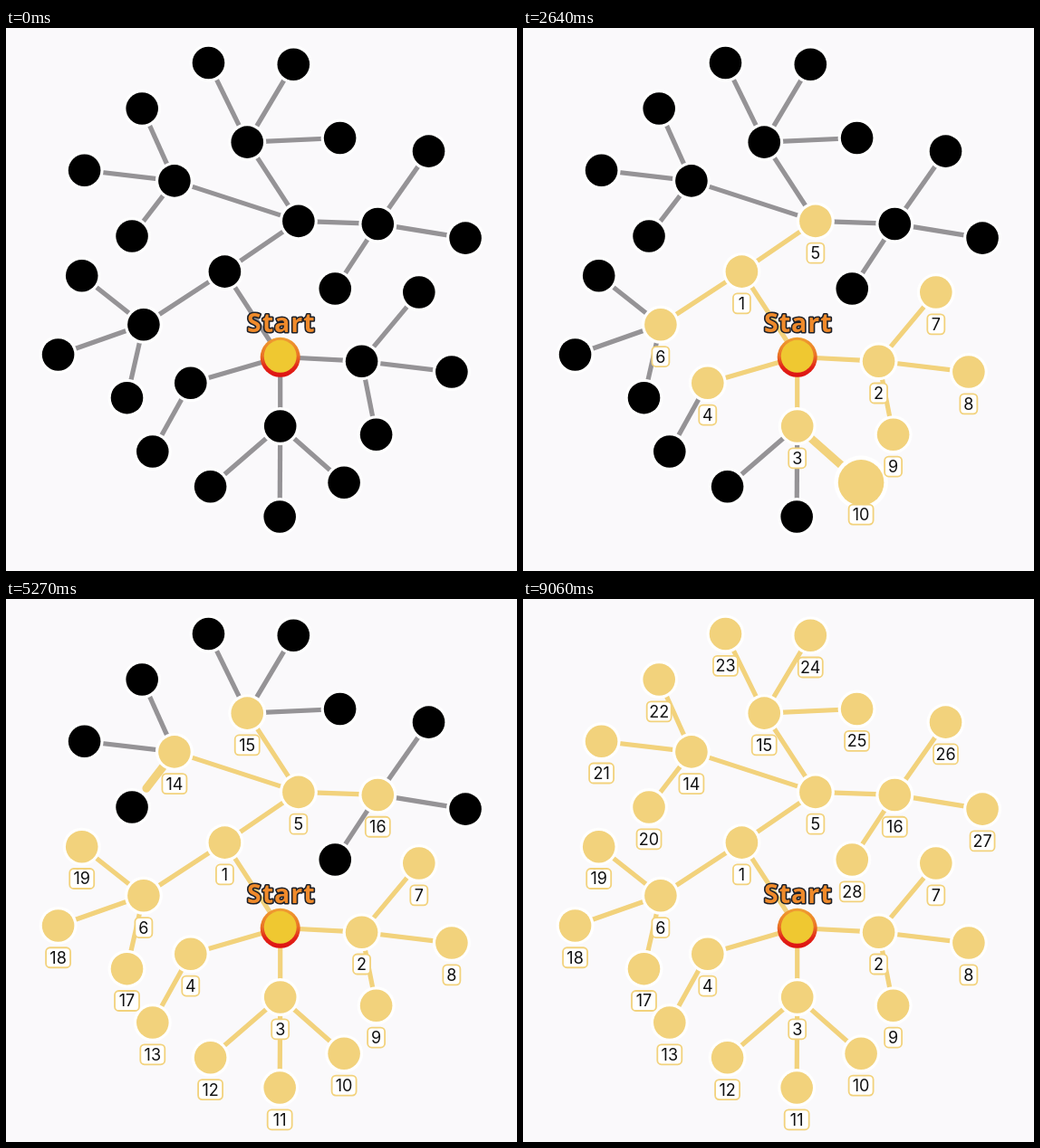
Animation, 564 px wide and 600 px high, one loop 9090 ms. Source, as an HTML page with a canvas:

```html
<!DOCTYPE html>
<html lang="en">
<head>
<meta charset="utf-8">
<title>Breadth-first walk</title>
<style>
  html, body { margin: 0; width: 100%; height: 100%; overflow: hidden; background: #faf9fb; }
  canvas { display: block; }
</style>
</head>
<body>
<canvas id="stage" width="564" height="600"></canvas>
<script>
const ctx = document.getElementById('stage').getContext('2d');
const LOOP = 9090, FIRST = 79, STEP = 267, GROW = 180;
const POP_FROM = 145, POP_TO = 198;
const GOLD = '#f2d27c', GRAY = '#959396', PAPER = '#faf9fb';
const TAU = Math.PI * 2;

// The index of a node is its place in the visiting order.
const root = { x: 302.7, y: 363.5 };
const nodes = [root];

function branch(from, degrees, reach) {
  const parent = nodes[from], a = degrees * TAU / 360;
  nodes.push({ x: parent.x + reach * Math.cos(a), y: parent.y + reach * Math.sin(a), parent });
}

// Three evenly turned branches, the middle one at full reach.
function fan(from, degrees, gap, reach, lastReach) {
  [reach, 100, lastReach].forEach((r, k) => branch(from, degrees + k * gap, r));
}

function buildTree() {
  branch(0, -123, 112.5);
  branch(0, 3, 90);
  branch(0, 90, 76.5);
  branch(0, 163.8, 103);
  branch(1, -34.4, 98.7);
  branch(1, 146.8, 107);
  branch(2, -50.3, 99);
  branch(2, 6.8, 100);
  branch(2, 78.8, 82.6);
  fan(3, 41.5, 48.8, 94, 102);
  branch(4, 119, 86.6);
  branch(5, 198, 144);
  branch(5, 237, 104);
  branch(5, 2, 87.5);
  fan(6, 102.8, 57.8, 83, 87);
  fan(14, 127.5, 59.2, 77, 87.5);
  fan(15, 244, 56.7, 97.5, 102.5);
  branch(16, -55, 98);
  branch(16, 9.2, 98);
  branch(16, 123.3, 85.7);
}

function disc(x, y, r, fill) {
  ctx.fillStyle = fill;
  ctx.beginPath();
  ctx.arc(x, y, r, 0, TAU);
  ctx.fill();
}

function drawEdge({ x, y, parent }, phase) {
  const active = phase >= 0;
  const part = active ? Math.min(phase / GROW, 1) : 1;
  ctx.strokeStyle = active ? GOLD : GRAY;
  ctx.lineWidth = active && phase < POP_TO ? 9 : 5.2;
  ctx.lineCap = active ? 'round' : 'butt';
  ctx.beginPath();
  ctx.moveTo(parent.x, parent.y);
  ctx.lineTo(parent.x + (x - parent.x) * part, parent.y + (y - parent.y) * part);
  ctx.stroke();
}

function drawNode({ x, y }, phase) {
  const pop = (phase - POP_FROM) / (POP_TO - POP_FROM);
  const scale = pop > 0 && pop < 1 ? 1 + 0.57 * Math.sin(Math.PI * pop) : 1;
  disc(x, y, 21 * scale, '#fff');
  disc(x, y, 17.8 * scale, pop >= 0 ? GOLD : '#000');
}

function drawLabel({ x, y }, phase, i) {
  if (phase < POP_FROM) return;
  const w = i < 10 ? 19 : 27, h = 22;
  ctx.beginPath();
  ctx.roundRect(x - w / 2, y + 35.3 - h / 2, w, h, 4.5);
  ctx.fillStyle = '#fff';
  ctx.fill();
  ctx.strokeStyle = GOLD;
  ctx.lineWidth = 1.8;
  ctx.stroke();
  ctx.fillStyle = '#111';
  ctx.font = '18px Inter, Arial, sans-serif';
  ctx.fillText(i, x, y + 41.8);
}

function drawStart({ x, y }) {
  const ring = ctx.createLinearGradient(0, y - 22, 0, y + 22);
  ring.addColorStop(0, '#efa032');
  ring.addColorStop(0.45, '#ea7426');
  ring.addColorStop(0.75, '#e22418');
  ring.addColorStop(1, '#dd1212');
  disc(x, y + 0.3, 22, ring);
  disc(x, y - 0.7, 18, '#efc831');

  ctx.font = '700 28.5px "Open Sans", sans-serif';
  ctx.letterSpacing = '1px';
  ctx.lineJoin = 'round';
  ctx.lineWidth = 3.2;
  ctx.strokeStyle = '#1c2029';
  ctx.strokeText('Start', x + 1.1, 336);
  ctx.fillStyle = '#ef8a2b';
  ctx.fillText('Start', x + 1.1, 336);
  ctx.letterSpacing = '0px';
}

function draw(t) {
  ctx.fillStyle = PAPER;
  ctx.fillRect(0, 0, 564, 600);
  ctx.textAlign = 'center';
  for (const paint of [drawEdge, drawNode, drawLabel]) {
    for (let i = 1; i < nodes.length; i++) {
      paint(nodes[i], t - FIRST - (i - 1) * STEP, i);
    }
  }
  drawStart(root);
}

buildTree();
const origin = performance.now();
function tick() {
  draw((performance.now() - origin) % LOOP);
  requestAnimationFrame(tick);
}
tick();
</script>
</body>
</html>
```
